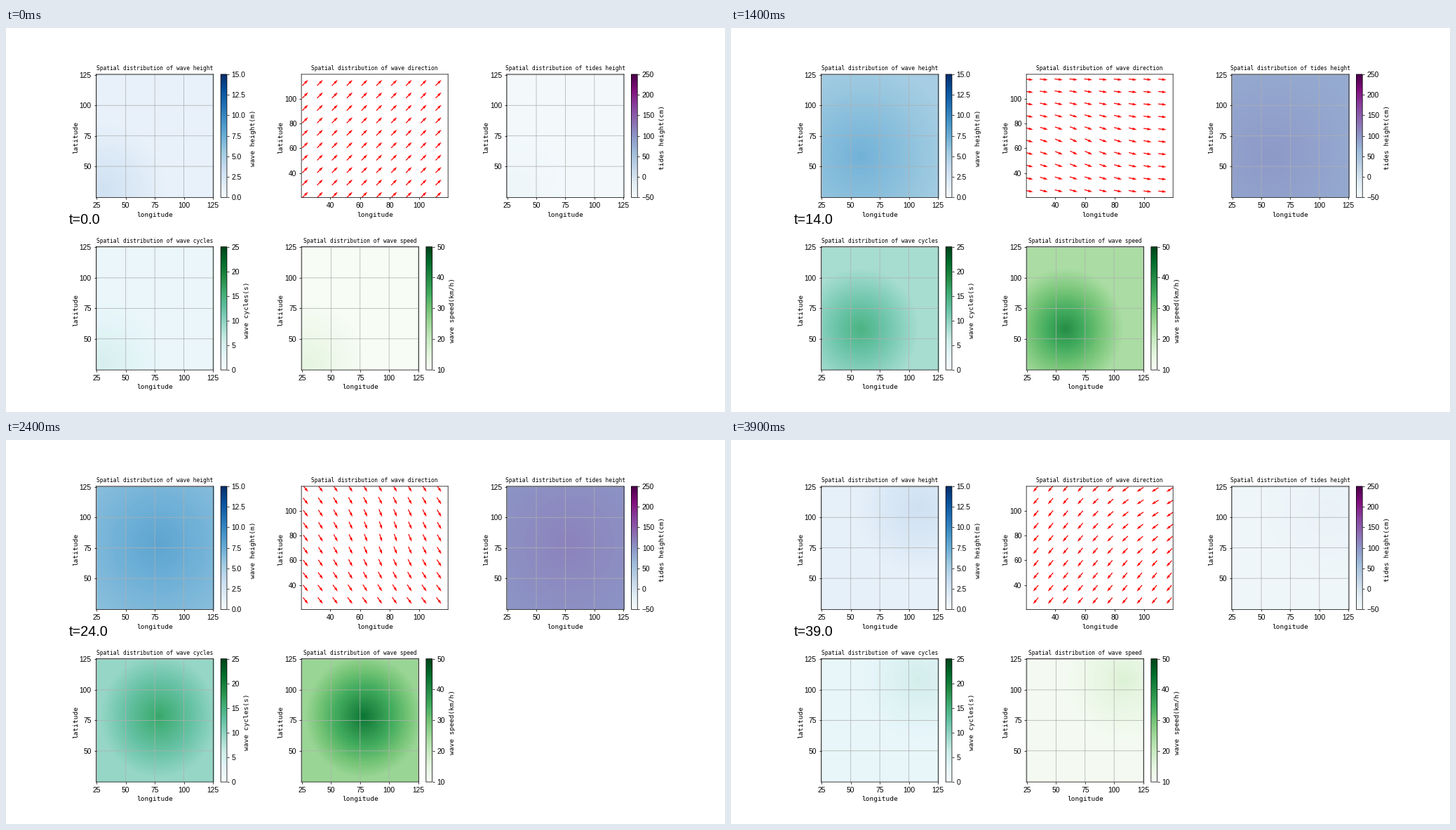
Recreate the animation shown at these times as a matplotlib script. Size 1025 px wide and 547 px high, loop 4000 ms.

```python
import numpy as np
import matplotlib.pyplot as plt
from matplotlib.animation import FuncAnimation

DPI = 68
WIDTH, HEIGHT = 1025, 547
FRAMES = 40
TEXT_FONT = "DejaVu Sans Mono"
DIGIT_FONT = "Liberation Sans"

plt.rcParams.update({
    "font.family": DIGIT_FONT,
    "xtick.labelsize": 10.8,
    "ytick.labelsize": 10.8,
    "path.snap": False,
})

fig, axes = plt.subplots(2, 3, figsize=(WIDTH / DPI, HEIGHT / DPI), dpi=DPI)
fig.subplots_adjust(left=128.5 / WIDTH, right=922.8 / WIDTH,
                    bottom=1 - 487.1 / HEIGHT, top=1 - 65.95 / HEIGHT,
                    wspace=0.4, hspace=0.4)
axes[1, 2].remove()

LABEL = dict(fontname=TEXT_FONT, fontsize=10)
grid_x, grid_y = np.meshgrid(np.arange(25, 126), np.arange(25, 126))
arrow_x, arrow_y = np.meshgrid(np.arange(25, 116, 10), np.arange(25, 116, 10))


def strength(t):
    """Storm strength: 0 at both ends of the loop, 1 in the middle."""
    return min(t, FRAMES - t) / (FRAMES / 2)


def cone(x, y, t, radius):
    """1 at the storm centre, falling evenly to 0 at the radius."""
    centre = 30 + 2 * t
    return np.clip(1 - np.hypot(x - centre, y - centre) / radius, 0, 1)


def decorate(ax, name):
    ax.set_title(f"Spatial distribution of {name}",
                 fontname=TEXT_FONT, fontsize=8.35)
    ax.set_xlabel("longitude", **LABEL)
    ax.set_ylabel("latitude", labelpad=1, y=0.485, **LABEL)


class Heatmap:
    """Each of calm, peak and radius is (at zero strength, at full strength)."""

    def __init__(self, ax, name, unit, cmap, ticks, calm, peak, radius, power):
        self.ranges = np.array([calm, peak, radius])
        self.power = power
        self.image = ax.imshow(
            self.values(0), cmap=cmap, vmin=ticks[0], vmax=ticks[-1],
            origin="lower", extent=(24.5, 125.5, 24.5, 125.5),
            aspect="auto", interpolation="nearest")
        decorate(ax, name)
        ax.set_xticks(range(25, 126, 25))
        ax.set_yticks(range(50, 126, 25))
        ax.grid(True)
        bar = fig.colorbar(self.image, ax=ax, ticks=ticks)
        bar.set_label(f"{name}({unit})", labelpad=6.7, y=0.485, **LABEL)

    def values(self, t):
        start, full = self.ranges.T
        calm, peak, radius = start + (full - start) * strength(t) ** self.power
        return calm + (peak - calm) * cone(grid_x, grid_y, t, radius)

    def update(self, t):
        self.image.set_data(self.values(t))


def arrow_vectors(t):
    base = np.interp(t, [0, 6, 14, 18, 24, 32, 40],
                     [45, 25, -6, -23, -52, -96, -135])
    swing = 21 * min(t / 6, 1)
    angle = np.radians(base - swing * cone(arrow_x, arrow_y, t, 60))
    return np.cos(angle), np.sin(angle)


heatmaps = [
    Heatmap(axes[0, 0], "wave height", "m", "Blues", np.arange(0, 15.1, 2.5),
            calm=(1.15, 7.9), peak=(3, 10), radius=(55, 95), power=1.4),
    Heatmap(axes[0, 2], "tides height", "cm", "BuPu", np.arange(-50, 251, 50),
            calm=(-44, 135), peak=(-36, 157), radius=(55, 95), power=1.05),
    Heatmap(axes[1, 0], "wave cycles", "s", "BuGn", np.arange(0, 26, 5),
            calm=(2.3, 11.7), peak=(5, 19.7), radius=(50, 50), power=1.15),
    Heatmap(axes[1, 1], "wave speed", "km/h", "Greens", np.arange(10, 51, 10),
            calm=(10, 30), peak=(15, 51), radius=(50, 50), power=1.05),
]

direction = axes[0, 1]
arrows = direction.quiver(arrow_x, arrow_y, *arrow_vectors(0),
                          color="red", pivot="tip")
decorate(direction, "wave direction")
direction.set(xlim=(20.5, 119.5), ylim=(20.5, 119.5),
              xticks=range(40, 101, 20), yticks=range(40, 101, 20))

clock = fig.text(89.5 / WIDTH, 1 - 279 / HEIGHT, "", fontsize=21,
                 va="baseline")


def update(frame):
    for heatmap in heatmaps:
        heatmap.update(frame)
    arrows.set_UVC(*arrow_vectors(frame))
    clock.set_text(f"t={frame:.1f}")


animation = FuncAnimation(fig, update, frames=FRAMES, interval=100,
                          repeat=True, repeat_delay=0)
plt.show()
```
